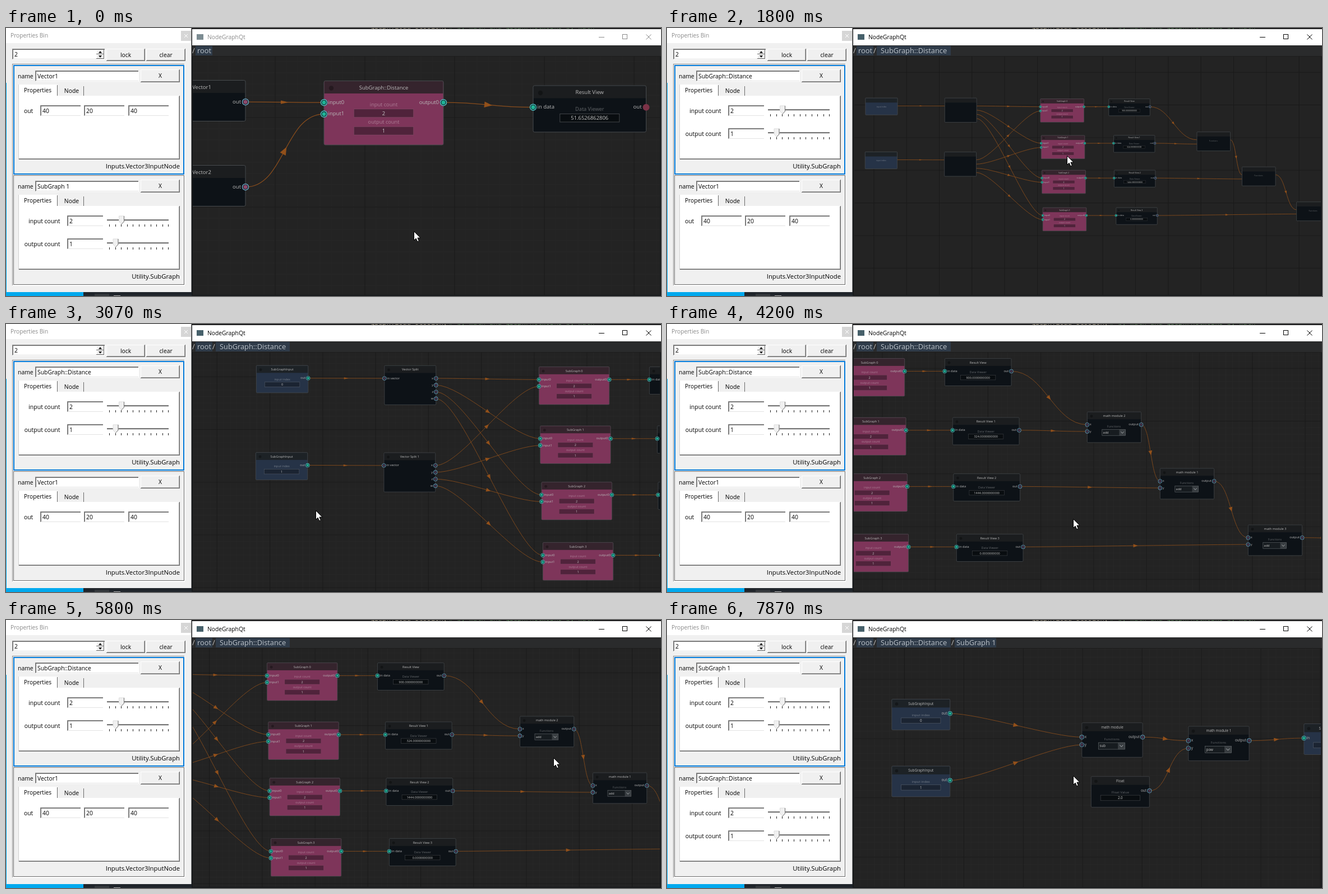
Animation, 1168 px wide and 479 px high, one loop 8 s. Source, as an HTML page with a canvas:

```html
<!DOCTYPE html>
<html lang="en">
<head>
<meta charset="utf-8">
<title>Node graph</title>
<style>
html, body { margin: 0; width: 100%; height: 100%; overflow: hidden; background: #1b1b1b; }
canvas { display: block; }
</style>
</head>
<body>
<canvas id="stage" width="1168" height="479"></canvas>
<script>
const ctx = document.getElementById('stage').getContext('2d');
const LOOP = 8000, STEP = 200 / 3;

// ---------- helpers ----------
function rect(x, y, w, h, color) {
  ctx.fillStyle = color;
  ctx.fillRect(x, y, w, h);
}
function text(s, x, y, size, color, align = 'left') {
  ctx.font = size + 'px "Open Sans", "Noto Sans", sans-serif';
  ctx.textAlign = align;
  ctx.fillStyle = color;
  ctx.fillText(s, x, y + size * 0.36);
}
function path(points) {
  ctx.beginPath();
  points.forEach(([x, y]) => ctx.lineTo(x, y));
}
function poly(points, fill, stroke) {
  path(points);
  ctx.closePath();
  ctx.fillStyle = fill;
  ctx.fill();
  if (stroke) { ctx.strokeStyle = stroke; ctx.stroke(); }
}
function line(points, color, width = 1) {
  path(points);
  ctx.strokeStyle = color;
  ctx.lineWidth = width;
  ctx.stroke();
}
function disc(x, y, r, color) {
  ctx.fillStyle = color;
  ctx.beginPath();
  ctx.arc(x, y, r, 0, 7);
  ctx.fill();
}
function frame(x, y, w, h, raised, dark) {
  const [a, b] = raised ? ['#ffffff', dark] : [dark, '#ffffff'];
  rect(x, y, w, 1, a);
  rect(x, y, 1, h, a);
  rect(x, y + h - 1, w, 1, b);
  rect(x + w - 1, y, 1, h, b);
}

// ---------- graphs ----------
const TEAL = '#1fb496', DIM = '#45344c', PINK = '#8d4a6c';
const DARK = { body: '#0d1217', head: '#1b1d1f' };
const BLUE = { body: '#263347', head: '#1d2226', labels: ['input index'], inC: TEAL, outC: TEAL };
const KINDS = {
  vec: { ...DARK, w: 156, h: 73, outs: ['out'], outC: PINK },
  sub: { body: '#7e355a', head: '#35242d', w: 213, h: 114.5, ins: ['input0', 'input1'], outs: ['output0'],
    labels: ['input count', 'output count'], inC: TEAL, outC: TEAL, solid: true },
  view: { ...DARK, w: 201.5, h: 83, ins: ['in data'], outs: ['out'], labels: ['Data Viewer'],
    inC: TEAL, outC: DIM, solid: true },
  split: { ...DARK, w: 156, h: 119, ins: ['in vector'], outs: ['x', 'y', 'z', 'w'], inC: DIM, outC: DIM },
  math: { ...DARK, w: 163.5, h: 93, ins: ['x', 'y'], outs: ['output'], combo: true, inC: DIM, outC: DIM },
  num: { ...DARK, w: 157, h: 83, outs: ['out'], labels: ['Float Value'], outC: DIM },
  input: { ...BLUE, w: 157, h: 83, outs: ['out'] },
  output: { ...BLUE, w: 157, h: 83, ins: ['in'] }
};

// k is the size of a node unit in the graph; (cx, cy) is shown mid-view on opening.
function makeGraph(k, cx, cy) {
  const g = { k, cx, cy, nodes: [], pipes: [] };
  g.add = (kind, x, y, title, ...vals) => {
    const n = { ins: [], outs: [], labels: [], ...KINDS[kind], x, y, title, vals };
    g.nodes.push(n);
    return n;
  };
  g.link = (from, to, inp = 0, out = 0) => g.pipes.push({ from, to, inp, out });
  return g;
}

function makeRoot() {
  const g = makeGraph(1, 750, 264);
  const sub = g.add('sub', 567, 94.5, 'SubGraph::Distance', '2', '1');
  const view = g.add('view', 940, 103, 'Result View', '51.6526862806');
  view.loose = true;
  for (let i = 0; i < 2; i++) g.link(g.add('vec', 271, 93.5 + 152 * i, 'Vector' + (i + 1)), sub, i);
  g.link(sub, view);
  return g;
}

function makeDistance() {
  const g = makeGraph(0.589, 1049, 261.5);
  const rowY = [76.5, 182, 282.5, 390.5], viewX = [1148, 1162, 1163.5, 1169];
  const squares = [30, 18, 38, 0];
  const splits = [0, 1].map(i => {
    const input = g.add('input', 447 - i, 74 + 155.6 * i, 'SubGraphInput', String(i));
    const split = g.add('split', 675.5 - i, 74.2 + 155.8 * i, 'Vector Split' + (i ? ' 1' : ''));
    g.link(input, split);
    return split;
  });
  const views = rowY.map((y, i) => {
    const sub = g.add('sub', 951 + 2.3 * i, y, 'SubGraph ' + i, '2', '1');
    const view = g.add('view', viewX[i], y, 'Result View' + (i ? ' ' + i : ''), (squares[i] ** 2).toFixed(10));
    splits.forEach((split, inp) => g.link(split, sub, inp, i));
    g.link(sub, view);
    return view;
  });
  // Running sum: each module adds one more row.
  let sum = views[0];
  [2, 1, 3].forEach((id, i) => {
    const add = g.add('math', 1402 + 130 * i + 13.5 * i * (i - 1), 172 + 101 * i, 'math module ' + id, 'add');
    g.link(sum, add);
    g.link(views[i + 1], add, 1);
    sum = add;
  });
  const root = g.add('math', 1859, 375, 'math module 4', 'sqrt');
  root.ins = ['x'];
  g.link(sum, root);
  return g;
}

function makeInner() {
  const g = makeGraph(0.662, 741.4, 268.7);
  const sub = g.add('math', 740, 183.7, 'math module', 'sub');
  const pow = g.add('math', 930, 190, 'math module 1', 'pow');
  for (let i = 0; i < 2; i++) {
    g.link(g.add('input', 401, 141.5 + 119.5 * i, 'SubGraphInput', String(i)), sub, i);
  }
  g.link(sub, pow);
  g.link(g.add('num', 756.5, 279.7, 'Float', '2.0'), pow, 1);
  g.link(pow, g.add('output', 1136, 185.5, 'SubGraphOutput', '0'));
  return g;
}

const SCENES = [
  { graph: makeRoot(), names: ['Vector1', 'SubGraph 1'], crumb: 'root' },
  { graph: makeDistance(), names: ['SubGraph::Distance', 'Vector1'], crumb: 'SubGraph::Distance' },
  { graph: makeInner(), names: ['SubGraph 1', 'SubGraph::Distance'], crumb: 'SubGraph 1' }
];

// ---------- gestures: start, end, kind, values ----------
// A drag pans by the pointer's path; a zoom holds the point under the pointer.
const GESTURES = [
  [0, 333, 'move', 595, 133],
  [867, 867, 'open', 1],
  [1067, 1200, 'move', 713, 228],
  [1200, 1800, 'zoom', 0.619],
  [1930, 2133, 'move', 374, 281],
  [2133, 2467, 'zoom', 1],
  [2667, 2733, 'move', 447, 288],
  [2733, 3067, 'drag', 552, 333],
  [3067, 3267, 'drag', 281, 320],
  [3267, 3467, 'move', 1105, 350],
  [3533, 4200, 'drag', 724, 348],
  [4200, 4333, 'drag', 676, 357],
  [4400, 4800, 'move', 913, 263],
  [4800, 5200, 'drag', 845, 263],
  [5267, 5700, 'drag', 1128, 269],
  [5700, 6067, 'move', 572, 185],
  [6067, 6267, 'zoom', 1.27],
  [6800, 6800, 'open', 2],
  [6867, 7600, 'move', 724, 278],
  [7600, 7867, 'zoom', 1]
];

function stateAt(t) {
  const s = { x: 727, y: 363, z: 1, tx: 0, ty: 0, depth: 0 };
  for (const [start, end, kind, a, b] of GESTURES) {
    if (t < start) break;
    const u = Math.min(1, (t - start) / (end - start || 1));
    if (kind === 'open') {
      const g = SCENES[a].graph;
      s.depth = a;
      s.z = 1 / g.k;
      s.tx = 750 - g.cx * s.z;
      s.ty = 264 - g.cy * s.z;
    } else if (kind === 'zoom') {
      const r = (a / s.z) ** u;
      s.tx = s.x + (s.tx - s.x) * r;
      s.ty = s.y + (s.ty - s.y) * r;
      s.z *= r;
    } else {
      const dx = (a - s.x) * u, dy = (b - s.y) * u;
      s.x += dx;
      s.y += dy;
      if (kind === 'drag') { s.tx += dx; s.ty += dy; }
    }
  }
  return s;
}

// ---------- graph drawing ----------
const portY = i => 38.7 + 20.6 * i;

function drawGrid(s, tx, ty) {
  const grid = (size, color, width) => {
    ctx.strokeStyle = color;
    ctx.lineWidth = width;
    ctx.beginPath();
    for (let x = 334 + ((tx - 334) % size + size) % size; x < 1166; x += size) {
      ctx.moveTo(x, 51); ctx.lineTo(x, 477);
    }
    for (let y = 51 + ((ty - 51) % size + size) % size; y < 477; y += size) {
      ctx.moveTo(334, y); ctx.lineTo(1166, y);
    }
    ctx.stroke();
  };
  if (s > 0.5) grid(20 * s, '#2b2b2b', 0.65 * Math.min(1, s + 0.2));
  grid(160 * s, '#191919', 0.8);
}

function drawPipe(k, { from, to, inp, out }, z) {
  const x0 = from.x + from.w * k, y0 = from.y + portY(out) * k;
  const x3 = to.x, y3 = to.y + portY(inp) * k;
  const dx = x3 - x0, dy = y3 - y0;
  const bend = Math.min(Math.abs(dx), from.w * k) / 2;
  ctx.strokeStyle = '#8a4d1c';
  ctx.lineWidth = Math.max(0.85, 1.3 * k * z) / z;
  ctx.beginPath();
  ctx.moveTo(x0, y0);
  ctx.bezierCurveTo(x0 + bend, y0, x3 - bend, y3, x3, y3);
  ctx.stroke();
  const half = Math.min(5.8, 2.8 + 0.3 * Math.abs(dy) / k);
  ctx.save();
  ctx.translate((x0 + x3) / 2, (y0 + y3) / 2);
  ctx.rotate(Math.atan2(dy, dx - bend));
  ctx.scale(k, k);
  poly([[7, 0], [-7, half], [-7, -half]], '#92501a');
  ctx.restore();
}

function drawPort(x, y, color, loose) {
  if (loose) return disc(x, y, 6, '#7b3247');
  disc(x, y, 6.2, color === TEAL ? '#4dc4c6' : '#6ba3bf');
  disc(x, y, 4.8, '#10191f');
  disc(x, y, 3.6, color);
}

function drawValues(n, full) {
  const mid = n.w / 2, pink = n.labels.length > 1;
  ctx.lineWidth = 1;
  n.labels.forEach((label, i) => {
    const y = 42 + 31.5 * i;
    text(label, mid, y, 9.2, 'rgba(255,255,255,.36)', 'center');
    if (!full) return;
    rect(mid - 53, y + 8.5, 106, 14.5, pink ? 'rgba(18,10,18,.42)' : 'rgba(0,0,0,.3)');
    ctx.strokeStyle = pink ? 'rgba(255,255,255,.08)' : 'rgba(255,255,255,.22)';
    ctx.strokeRect(mid - 53, y + 8.5, 106, 14.5);
    text(n.vals[i], mid, y + 16, 9.4, '#c6c6c6', 'center');
  });
  if (!n.combo) return;
  text('Functions', mid - 1, 43.5, 9.2, 'rgba(255,255,255,.34)', 'center');
  if (!full) return;
  rect(45, 53.5, 71, 18, '#171c20');
  rect(97, 53.5, 19, 18, '#383d41');
  ctx.strokeStyle = '#666b6e';
  ctx.strokeRect(45, 53.5, 71, 18);
  line([[102, 60], [106.5, 65], [111, 60]], '#c0c4c6', 1.3);
  text(n.vals[0], 48, 62.5, 9.4, '#c6c6c6');
}

function drawNode(n, k, s) {
  const full = n.solid || s > 0.5;
  ctx.save();
  ctx.translate(n.x, n.y);
  ctx.scale(k, k);
  ctx.beginPath();
  ctx.roundRect(0, 0, n.w, n.h, 2.5);
  ctx.fillStyle = n.body;
  ctx.fill();
  rect(0.5, 0.5, n.w - 1, 22, n.head);
  ctx.strokeStyle = '#474b4e';
  ctx.lineWidth = Math.max(1, 0.75 / s);
  ctx.stroke();
  drawValues(n, full);
  if (full) {
    disc(13, 13, 4.2, 'rgba(0,0,0,.3)');
    text(n.title, n.w / 2, 11.8, 9.5, '#bcbcbc', 'center');
    n.ins.forEach((name, i) => {
      drawPort(0, portY(i), n.inC);
      text(name, 7.5, portY(i) - 0.8, 9.5, '#b9b9b9');
    });
    n.outs.forEach((name, i) => {
      drawPort(n.w, portY(i), n.outC, n.loose);
      text(name, n.w - 8, portY(i) - 0.8, 9.5, '#b9b9b9', 'right');
    });
  }
  ctx.restore();
}

function drawGraph({ k, nodes, pipes }, { z, tx, ty }) {
  ctx.save();
  ctx.beginPath();
  ctx.rect(333, 51, 833, 426);
  ctx.clip();
  rect(333, 51, 833, 426, '#232323');
  drawGrid(k * z, tx, ty);
  ctx.translate(tx, ty);
  ctx.scale(z, z);
  pipes.forEach(p => drawPipe(k, p, z));
  nodes.forEach(n => drawNode(n, k, k * z));
  ctx.restore();
}

// ---------- windows ----------
function drawDesktop() {
  rect(0, 0, 1168, 479, '#1b1b1c');
  rect(0, 472, 138, 7, '#00a9ee');
  rect(138, 472, 193, 7, '#20252b');
  rect(158, 475, 26, 4, '#33373b');
  rect(192, 478, 12, 1, '#b0b0b0');
  ctx.font = '12px "Noto Sans Mono", monospace';
  ctx.textAlign = 'left';
  ctx.fillStyle = '#a9a08a';
  ctx.fillText('graph.load_session(', 650, 1);
  ctx.fillStyle = '#4e7a4e';
  ctx.fillText('# by math and graph/networks by math', 790, 1);
}

function drawMainWindow(active, depth) {
  const ink = active ? '#000000' : '#8a8a8a';
  rect(331, 2, 837, 477, '#17191b');
  rect(332, 2, 836, 29, '#ffffff');
  rect(340, 11, 12, 10, active ? '#46606a' : '#7c8c92');
  text('NodeGraphQt', 359, 16.5, 10.3, ink);
  rect(1057, 16, 10, 1, ink);
  ctx.strokeStyle = ink;
  ctx.lineWidth = 1;
  ctx.strokeRect(1099.5, 11.5, 8, 8);
  line([[1141.5, 11.5], [1150.5, 20.5]], ink);
  line([[1150.5, 11.5], [1141.5, 20.5]], ink);
  rect(332, 31, 836, 19, '#2a2b2c');
  rect(332, 50, 836, 1, '#1d1d1d');
  const slots = [[338, 30, 341], [374, 132, 381], [513, 74, 516]];
  slots.slice(0, depth + 1).forEach(([x, w, tx], i) => {
    rect(x, 32, w, 17, '#2f3b49');
    text('/', x - 6, 40.5, 12.8, '#c4c4c4');
    text(SCENES[i].crumb, tx, 40.5, 12.8, '#bcc3ca');
  });
}

function field(s, x, y, w, h) {
  rect(x, y, w, h, '#ffffff');
  frame(x, y, w, h, false, '#8c8c8c');
  rect(x + 1, y + 1, w - 2, 1, '#696969');
  rect(x + 1, y + 1, 1, h - 2, '#696969');
  rect(x + 1, y + h - 2, w - 2, 1, '#e3e3e3');
  text(s, x + 4, y + h / 2 + 0.5, 10.4, '#000');
}
function button(s, x, y, w, h) {
  rect(x, y, w, h, '#f0f0f0');
  frame(x, y, w, h, true, '#696969');
  rect(x + 1, y + h - 2, w - 2, 1, '#a0a0a0');
  rect(x + w - 2, y + 1, 1, h - 2, '#a0a0a0');
  text(s, x + w / 2, y + h / 2, 10.3, '#000', 'center');
}
function slider(y, value) {
  rect(180, y - 3, 110, 1, '#8c8c8c');
  rect(180, y - 2, 110, 1, '#5c5c5c');
  rect(180, y - 1, 110, 1, '#e3e3e3');
  for (let i = 0; i <= 10; i++) rect(Math.round(184 + i * 10.5), y + 6, 1, 4, '#222');
  const x = 184.5 + value * 10.5;
  ctx.lineWidth = 1;
  poly([[x - 4, y - 9], [x + 5, y - 9], [x + 5, y + 1], [x + 0.5, y + 5.5], [x - 4, y + 1]], '#f0f0f0', '#dcdcdc');
  line([[x + 5, y - 9], [x + 5, y + 1], [x + 0.5, y + 5.5]], '#707070');
}

function drawItem(top, name, selected) {
  const vector = name === 'Vector1';
  const b = selected ? 2 : 1;
  rect(13, top, 305, 196, selected ? '#0078d7' : '#6a6a6a');
  rect(13 + b, top + b, 305 - 2 * b, 196 - 2 * b, '#f0f0f0');
  text('name', 21, top + 20, 10.4, '#000');
  field(name, 52, top + 10, 185, 20);
  button('X', 240, top + 8, 70, 23);
  rect(22, top + 55, 288, 114, '#ffffff');
  frame(22, top + 55, 288, 114, true, '#696969');
  rect(22, top + 55, 1, 114, '#d0d0d0');
  rect(23, top + 167, 286, 1, '#a0a0a0');
  rect(308, top + 56, 1, 112, '#a0a0a0');
  rect(93, top + 37, 46, 18, '#f0f0f0');
  rect(138, top + 38, 1, 17, '#696969');
  rect(22, top + 35, 70, 21, '#ffffff');
  rect(22, top + 35, 1, 21, '#d0d0d0');
  rect(91, top + 36, 1, 19, '#696969');
  text('Properties', 56.5, top + 45.5, 10.2, '#000', 'center');
  text('Node', 117, top + 46.5, 10.4, '#000', 'center');
  if (vector) {
    text('out', 32, top + 82, 10.3, '#000');
    ['40', '20', '40'].forEach((v, i) => field(v, 61 + Math.floor(i * 78.5), top + 72, 73, 20));
  } else {
    [['input count', 2], ['output count', 1]].forEach(([label, v], i) => {
      const y = top + 82 + i * 41;
      text(label, 96.5, y + 0.5, 10.5, '#000', 'right');
      field(String(v), 109, y - 10, 65, 20);
      slider(y, v);
    });
  }
  text(vector ? 'Inputs.Vector3InputNode' : 'Utility.SubGraph', 310, top + 181, 11.3, '#000', 'right');
}

function drawPanel(names) {
  rect(0, 0, 331, 472, '#f0f0f0');
  rect(0, 0, 330, 27, '#ffffff');
  rect(0, 98, 1, 374, '#00a9ee');
  rect(330, 0, 1, 472, '#8a8a8a');
  text('Properties Bin', 8, 13, 10.2, '#8a8a8a');
  rect(312, 5, 18, 18, '#d6d6d6');
  line([[318, 11], [324, 17]], '#fff');
  line([[324, 11], [318, 17]], '#fff');
  field('2', 11, 37, 166, 20);
  rect(161, 39, 14, 16, '#f0f0f0');
  for (const [y, tip] of [[39, -1.75], [47, 1.75]]) {
    frame(161, y, 14, 8, true, '#696969');
    poly([[165, y + 4 - tip], [168, y + 4 + tip], [171, y + 4 - tip]], '#000');
  }
  button('lock', 179, 37, 69, 22);
  button('clear', 250, 37, 70, 22);
  rect(11, 64, 308, 397, '#ffffff');
  frame(11, 64, 308, 397, false, '#8c8c8c');
  names.forEach((name, i) => drawItem(66 + 197 * i, name, i === 0));
}

function drawPointer({ x, y }) {
  ctx.save();
  ctx.translate(Math.round(x) + 0.5, Math.round(y) + 0.5);
  ctx.lineWidth = 1;
  poly([[0, 0], [0, 16], [3.6, 12.6], [6.2, 18.3], [8.8, 17.2], [6.4, 11.6], [11.4, 11.6]], '#fff', '#000');
  ctx.restore();
}

function draw(ms) {
  const t = Math.floor((ms + 4) / STEP) * STEP + 0.4;
  const state = stateAt(t);
  const { graph, names } = SCENES[state.depth];
  drawDesktop();
  drawMainWindow(t >= 533, state.depth);
  drawGraph(graph, state);
  drawPanel(names);
  drawPointer(state);
}

const start = performance.now();
function tick() {
  draw((performance.now() - start) % LOOP);
  requestAnimationFrame(tick);
}
tick();
</script>
</body>
</html>
```
